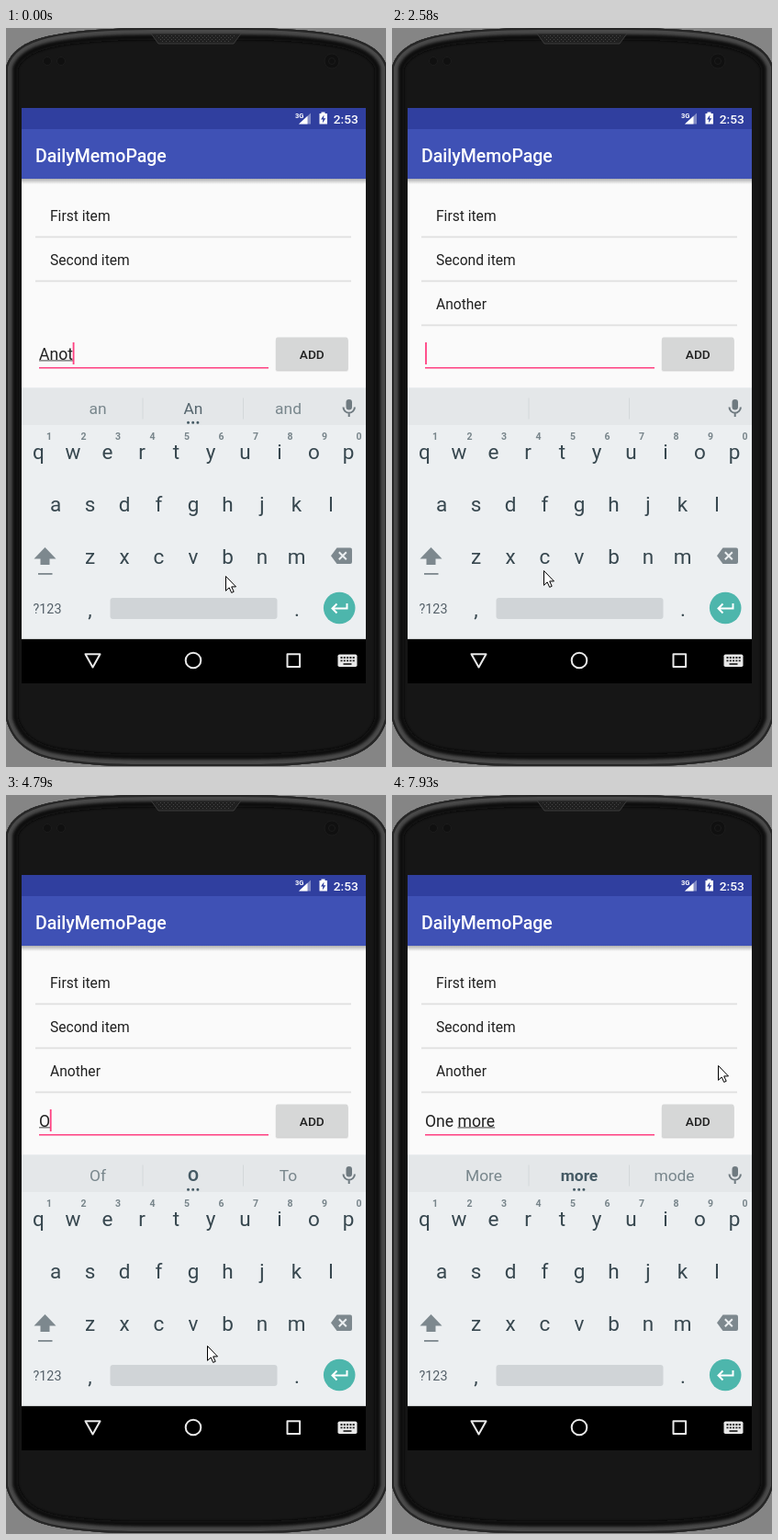
Write an HTML page that moves like this. It is 414 px wide and 804 px high and loops after 8000 ms.

```html
<!DOCTYPE html>
<html lang="en">
<head>
<meta charset="utf-8">
<title>To-do list demo</title>
<style>
  html, body { margin: 0; width: 100%; height: 100%; overflow: hidden; background: #858585; }
  svg { display: block; width: 414px; height: 804px; font-family: Roboto, "Noto Sans", sans-serif; }
  text { white-space: pre; }
  .mid { text-anchor: middle; }
  .medium { font-weight: 500; }
  .item { font-size: 15.6px; fill: #212121; }
  .key { font-size: 22.5px; fill: #37474f; text-anchor: middle; }
  .hint { font-size: 10.5px; font-weight: 700; fill: #78858b; text-anchor: middle; }
  .word { font-size: 17.4px; fill: #78868c; text-anchor: middle; }
  .nav { fill: none; stroke: #e8e8e8; stroke-width: 2; stroke-linejoin: round; }
</style>
</head>
<body>
<svg viewBox="0 0 414 804" xmlns="http://www.w3.org/2000/svg">
  <defs>
    <linearGradient id="drop" x2="0" y2="1">
      <stop offset="0" stop-opacity=".3"/>
      <stop offset="1" stop-opacity="0"/>
    </linearGradient>
    <pattern id="mesh" width="4" height="4" patternUnits="userSpaceOnUse">
      <path d="M0 0h1v1h-1zM2 2h1v1h-1z" fill="#444"/>
    </pattern>
    <filter id="soft" filterUnits="userSpaceOnUse" x="-30" y="-30" width="474" height="864">
      <feGaussianBlur stdDeviation="1.800"/>
    </filter>
    <path id="body" d="M0 42C5 25 20 15 45 9C72 3 110 0 160 0H254C304 0 342 3 369 9C394 15 410 25 415 42V752C408 778 388 792 356 797C324 802 300 803 264 803H150C114 803 90 802 58 797C26 792 7 778 0 752Z"/>
    <clipPath id="inside"><use href="#body"/></clipPath>
    <clipPath id="screen"><rect x="17" y="87" width="375" height="626"/></clipPath>
  </defs>

  <rect width="414" height="804" fill="#858585"/>
  <use href="#body" fill="#161616"/>
  <g clip-path="url(#inside)" fill="none">
    <use href="#body" stroke="#0a0a0a" stroke-width="26" filter="url(#soft)"/>
    <use href="#body" stroke="#484848" stroke-width="14" filter="url(#soft)"/>
    <use href="#body" stroke="#262626" stroke-width="4"/>
  </g>
  <path d="M158 6L166 17H248L256 6Z" fill="#202020" stroke="#3c3c3c"/>
  <path d="M164 8L169 16H245L250 8Z" fill="url(#mesh)"/>
  <g fill="#101010" stroke="#1c1c1c">
    <circle cx="45" cy="36" r="4.500"/><circle cx="60" cy="36" r="4.500"/><circle cx="355" cy="36" r="8"/>
    <circle cx="355" cy="36" r="3.500"/>
  </g>

  <g clip-path="url(#screen)">
    <rect x="17" y="87" width="375" height="626" fill="#fafafa"/>
    <rect x="17" y="164" width="375" height="6" fill="url(#drop)"/>
    <rect x="17" y="87" width="375" height="23" fill="#303f9f"/>
    <rect x="17" y="110" width="375" height="54" fill="#3f51b5"/>
    <text x="32" y="145.500" class="medium" font-size="19.500" fill="#fff">DailyMemoPage</text>
    <g fill="#fff">
      <text x="315" y="98" font-size="7.500" font-weight="700">3G</text>
      <path d="M332 92.500V104.500H319Z" opacity=".4"/>
      <path d="M328.500 95.700V104.500H319Z"/>
      <path d="M343.500 91.500h4v1.500h2.500v11.500h-8.500v-11.500h2z"/>
      <path d="M346.500 94.500l-3.500 5h2.300l-.5 4 3.500-5.200h-2.300z" fill="#303f9f"/>
      <text x="356.800" y="104" class="medium" font-size="13.700">2:53</text>
    </g>
    <g id="list"></g>

    <g id="form">
      <path d="M36 369.700H286" stroke="#ff4081" stroke-width="1.500"/>
      <text id="typed" x="36" y="360.500" font-size="17.600" fill="#212121"></text>
      <path id="compose" stroke="#666" stroke-width="1.200"/>
      <rect id="caret" y="342" width="1.800" height="24" fill="#ff4081"/>
      <rect x="293.500" y="338" width="79.500" height="36" rx="2.500" fill="#000" opacity=".07"/>
      <rect x="294" y="338" width="78.500" height="35" rx="2" fill="#000" opacity=".1"/>
      <rect id="button" x="294" y="336.500" width="78.500" height="35.800" rx="2"/>
      <text x="333.300" y="359.700" class="mid medium" font-size="13.700" fill="#212121">ADD</text>
    </g>

    <rect x="17" y="664.600" width="375" height="49"/>

    <g id="keyboard">
      <rect x="17" y="391.500" width="375" height="273.100" fill="#eceff1"/>
      <rect x="17" y="391.500" width="375" height="40.500" fill="#e4e7e9"/>
      <path d="M149 402.500V425.500M258.500 402.500V425.500" stroke="#d3d8da"/>
      <g id="words">
        <text class="word" x="100" y="420"></text>
        <text class="word" x="204" y="420"></text>
        <text class="word" x="307.500" y="420"></text>
      </g>
      <path id="dots" d="M198.500 429.300h.01M203.700 429.300h.01M208.900 429.300h.01" stroke="#455a64" stroke-width="3" stroke-linecap="round"/>
      <g fill="none" stroke="#6f7a80" stroke-width="2">
        <rect x="371.500" y="405" width="4.500" height="9.500" rx="2.250" fill="#6f7a80"/>
        <path d="M367.500 412.500a6.200 6.200 0 0 0 12.400 0M373.700 418.500V423"/>
      </g>
      <g id="keys"></g>
      <g fill="#7d888e">
        <path d="M42.500 565L54.500 577.500H47.500V584H37.500V577.500H30.500Z"/>
        <rect x="35" y="593" width="15.500" height="1.800"/>
        <path d="M360.500 565.500H375a2 2 0 0 1 2 2V581a2 2 0 0 1-2 2H360.500L354 574.300Z"/>
      </g>
      <path d="M362.800 570.300l8 8m0-8l-8 8" stroke="#eceff1" stroke-width="2"/>
      <text x="45" y="637" class="mid" font-size="14.300" fill="#546069">?123</text>
      <rect x="113.500" y="620" width="182" height="23" rx="3" fill="#d0d4d7"/>
      <circle cx="363.200" cy="631" r="17.300" fill="#4db6ac"/>
      <path d="M371.500 626V631.500H356M360.500 626.500L355.500 631.500L360.500 636.500" fill="none" stroke="#fff" stroke-width="2"/>
    </g>

    <g class="nav">
      <path id="back"/>
      <circle cx="204" cy="688" r="8.300"/>
      <rect x="306.500" y="681.300" width="13.600" height="13.600"/>
    </g>
    <g id="switcher">
      <rect x="361.500" y="681.500" width="21" height="13.500" rx="1.800" fill="#e8e8e8"/>
      <path d="M364.500 685H380M364.500 688.300H380" stroke="#222" stroke-width="1.800" stroke-dasharray="2 1.300"/>
      <path d="M367.500 692H376.500" stroke="#222" stroke-width="1.700"/>
    </g>
  </g>

  <path id="mouse" d="M.5 .5V16.300L4.200 12.900L6.700 18.400L9.200 17.300L6.700 11.900H11.500Z" fill="#fff" stroke="#000" stroke-width="1"/>
</svg>

<script>
const LOOP = 8000;
const $ = id => document.getElementById(id);

function add(parent, tag, attrs, content = "") {
  const el = document.createElementNS("http://www.w3.org/2000/svg", tag);
  for (const name in attrs) el.setAttribute(name, attrs[name]);
  el.textContent = content;
  return parent.appendChild(el);
}

// Keyboard rows: letters, first centre, baseline
const PITCH = 37.5;
[["qwertyuiop", 35.5, 468.8], ["asdfghjkl", 54, 526], ["zxcvbnm", 91.5, 583.3]].forEach(([row, x, y]) =>
  [...row].forEach((c, i) => add($("keys"), "text", { class: "key", x: x + i * PITCH, y }, c)));
[..."1234567890"].forEach((c, i) =>
  add($("keys"), "text", { class: "hint", x: 47 + i * PITCH, y: 448 }, c));
add($("keys"), "text", { class: "key", x: 91.5, y: 640 }, ",");
add($("keys"), "text", { class: "key", x: 317, y: 640 }, ".");

const rows = ["First item", "Second item", "Another"].map((label, i) => {
  const y = 209.5 + i * 48;
  const row = add($("list"), "g", {});
  add(row, "text", { class: "item", x: 48, y }, label);
  add(row, "rect", { x: 32, y: y + 17, width: 344, height: 1.8, fill: "#e0e0e0" });
  return row;
});

// Each step overrides part of the state from its time on.
// from: start of the underlined word; kb: keyboard [opacity, shift]; words: "*" marks bold
const steps = [
  [0, { text: "Anot", from: 0, caret: 1, words: "an,An,and", mouse: [239, 596], items: 2, kb: [1, 0], up: 1, press: 0 }],
  [130, { text: "Anoth" }],
  [260, { words: "Anot,Another,Anita" }],
  [400, { text: "Anothe", words: "Another,*Anoth,Another's" }],
  [540, { text: "Another" }],
  [670, { words: "An other,*Another,Another's" }],
  [1070, { caret: 0 }],
  [1210, { mouse: [241, 582] }],
  [1350, { mouse: [250, 540] }],
  [1490, { mouse: [266, 482] }],
  [1640, { mouse: [284, 430], caret: 1 }],
  [1780, { mouse: [297, 393] }],
  [1910, { mouse: [304, 376] }],
  [2060, { mouse: [317, 355], caret: 0 }],
  [2190, { press: 1, caret: 1, text: "", words: "", items: 3 }],
  [2330, { press: 0, mouse: [270, 440] }],
  [2460, { mouse: [165, 590] }],
  [2600, { mouse: [95, 679] }],
  [2740, { up: 0, kb: [.5, 45] }],
  [2880, { kb: [0, 80], mouse: [106, 655], caret: 0 }],
  [3000, { mouse: [147, 586] }],
  [3120, { mouse: [152, 617] }],
  [3390, { caret: 1 }],
  [3520, { up: 1 }],
  [3660, { kb: [.2, 70], mouse: [156, 613] }],
  [3780, { kb: [.6, 39.5], mouse: [174, 605] }],
  [3930, { kb: [1, 0], mouse: [219, 599] }],
  [4360, { caret: 0 }],
  [4790, { text: "O", caret: 1, words: "Of,*O,To" }],
  [4940, { text: "On" }],
  [5080, { text: "One", words: "On,*On,One" }],
  [5210, { words: "One's,*One,Once" }],
  [5640, { text: "One ", from: 4 }],
  [5870, { words: "day,of,more" }],
  [6010, { caret: 0 }],
  [6280, { text: "One m", caret: 1 }],
  [6410, { words: "my,m,me" }],
  [6540, { text: "One mo" }],
  [6670, { words: "no,mo,more" }],
  [6950, { text: "One mor" }],
  [7100, { text: "One more" }],
  [7230, { words: "More,*more,mode" }],
  [7510, { mouse: [240, 545] }],
  [7650, { mouse: [292, 420], caret: 0 }],
  [7790, { mouse: [348, 290] }],
  [7930, { mouse: [355, 294] }]
];

const pen = document.createElement("canvas").getContext("2d");
pen.font = '17.6px Roboto, "Noto Sans", sans-serif';
const widthOf = s => pen.measureText(s).width;
const show = (el, on) => el.setAttribute("visibility", on ? "visible" : "hidden");

function render(t) {
  const s = Object.assign({}, ...steps.filter(([at]) => at <= t).map(([, change]) => change));
  const end = 36 + widthOf(s.text);

  $("typed").textContent = s.text;
  $("compose").setAttribute("d", s.from < s.text.length
    ? `M${36 + widthOf(s.text.slice(0, s.from))} 361.800H${end}` : "");
  $("caret").setAttribute("x", Math.max(36.1, end - .3));
  show($("caret"), s.caret);
  $("button").setAttribute("fill", s.press ? "#bcbdbd" : "#d6d7d7");
  $("form").setAttribute("transform", `translate(0 ${s.up ? 0 : 271.5})`);
  rows.forEach((row, i) => show(row, i < s.items));

  const words = s.words.split(",");
  [...$("words").children].forEach((el, i) => {
    const word = words[i] || "";
    const bold = word.startsWith("*");
    el.textContent = word.replace("*", "");
    el.style.fontWeight = bold ? 700 : 400;
    el.style.fill = i === 1 ? (bold ? "#455a64" : "#56666e") : "";
  });
  show($("dots"), s.words);

  const [opacity, shift] = s.kb;
  $("keyboard").setAttribute("opacity", opacity);
  $("keyboard").setAttribute("transform", `translate(0 ${shift})`);
  $("back").setAttribute("d", s.up ? "M86.500 681.200H102.500L94.500 695.500Z" : "M102 680.500V696L87.500 688.200Z");
  show($("switcher"), s.up);
  $("mouse").setAttribute("transform", `translate(${s.mouse})`);
}

const start = performance.now();
function tick() {
  render((performance.now() - start) % LOOP);
  requestAnimationFrame(tick);
}
tick();
</script>
</body>
</html>
```
